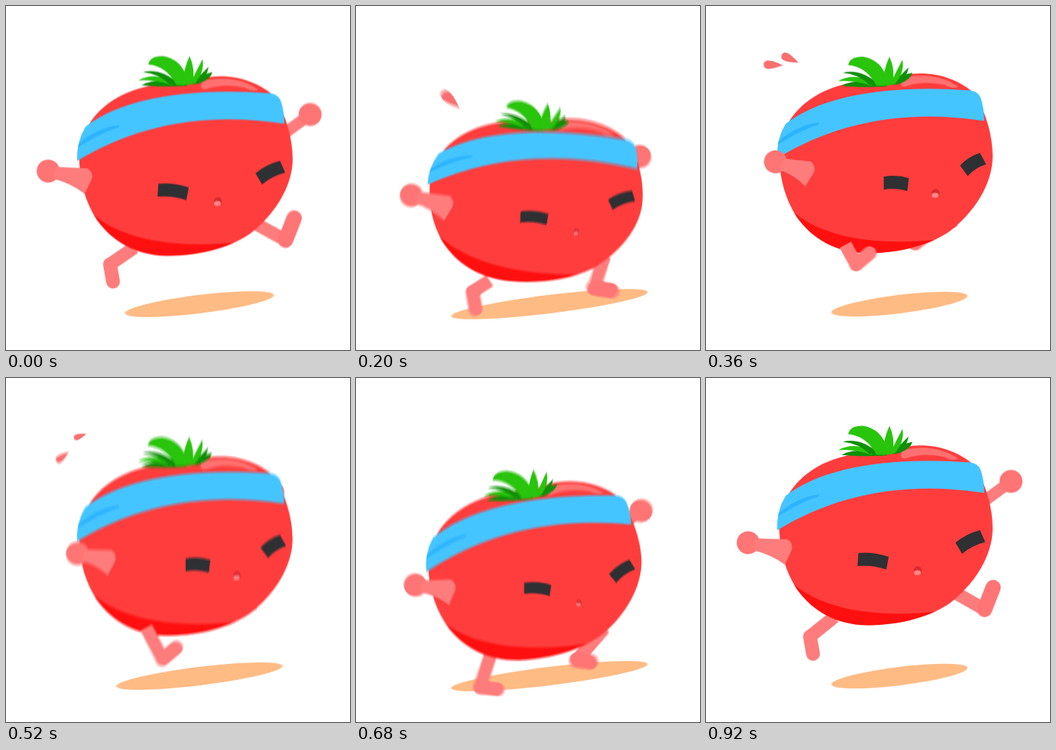
An HTML page with a canvas for the animation above (0.96 s loop, 450 px wide and 450 px high).

```html
<!DOCTYPE html>
<html lang="en">
<head>
<meta charset="utf-8">
<title>Running tomato</title>
<style>
html, body { margin: 0; width: 100%; height: 100%; overflow: hidden; background: #fff; }
canvas { display: block; width: 100vw; height: 100vh; }
</style>
</head>
<body>
<canvas id="stage" width="450" height="450"></canvas>
<script>
const SIZE = 450, LOOP = 960, STEP = 40;
const SHUTTER = 12, SAMPLES = 5;
const RED = '#ff3d3d', DEEP = '#ff1010', SKIN = '#ff7c7c', HAND = '#ff7575';
const BLUE = '#45c5ff', BLUE_DARK = '#2cb3ff', EYE = '#2e3033';
const GREEN = '#29c40c', GREEN_DARK = '#109008', SHADOW = '#ffbb84';

const screen = document.getElementById('stage').getContext('2d');
const layer = document.createElement('canvas');
layer.width = layer.height = SIZE;
const c = layer.getContext('2d');

const rad = deg => deg * Math.PI / 180;
// Cosine wave that peaks at the given time, some number of times per loop.
const wave = (t, peak, cycles = 1) => Math.cos(2 * Math.PI * cycles * (t - peak) / LOOP);
const ease = (t, from, to) => {
  const u = Math.min(1, Math.max(0, (t - from) / (to - from)));
  return u * u * (3 - 2 * u);
};

// Everything the run cycle shares: two bounces and one turn of the body per loop.
function poseAt(t) {
  const bounce = wave(t, 160, 2);
  const sink = (1 + bounce) / 2;
  const press = sink ** 3;
  const lean = wave(t, 200);
  return {
    t, bounce, press,
    dy: -7 + 54 * sink ** 1.9,
    tilt: press * (1.4 + 5.1 * lean),
    squash: 1 - press * (.055 + .03 * lean),
    leafDrop: 6 + 4.5 * wave(t, 240, 2),
    turn: wave(t, 460),
    swing: wave(t, 240),
    stride: wave(t, 460, 2)
  };
}

function shape(color, path) {
  c.fillStyle = color;
  c.fill(typeof path === 'string' ? new Path2D(path) : path);
}

function disc(color, x, y, rx, ry = rx, angle = 0) {
  c.fillStyle = color;
  c.beginPath();
  c.ellipse(x, y, rx, ry, rad(angle), 0, 2 * Math.PI);
  c.fill();
}

function line(color, width, cap, x0, y0, x1, y1) {
  c.strokeStyle = color;
  c.lineWidth = width;
  c.lineCap = cap;
  c.beginPath();
  c.moveTo(x0, y0);
  c.lineTo(x1, y1);
  c.stroke();
}

function placed(x, y, angle, draw) {
  c.save();
  c.translate(x, y);
  c.rotate(rad(angle));
  draw();
  c.restore();
}

function drawShadow({ bounce }) {
  disc(SHADOW, 253, 390, 109.5 + 23 * bounce, 12, -7);
}

function drawLeg(hipX, hipY, x, y, footAngle, footLength, footWidth, footColor) {
  const toeX = x + footLength * Math.cos(rad(footAngle));
  const toeY = y + footLength * Math.sin(rad(footAngle));
  line(SKIN, 17, 'butt', hipX, hipY, x, y);
  line(footColor, footWidth, 'round', x, y, toeX, toeY);
}

function drawNearLeg({ t, dy, turn, stride }) {
  const angle = 80 - 120 * (ease(t, 220, 350) - ease(t, 520, 900));
  drawLeg(176 + 8 * turn, 319 + dy,
    165 + 37 * turn + 8 * stride, 349 + dy + 16 * wave(t, 640), angle, 23, 18, SKIN);
}

function drawFarLeg({ t, dy, stride }) {
  const reach = wave(t, -5);
  drawLeg(325, 287 + dy,
    308 + 50 * reach + 8 * stride, 319 + dy - 10 * stride,
    -30 - 40 * stride, 20 + 11 * reach, 20, HAND);
}

function drawFarArm({ t, dy, swing }) {
  const x = 372 + 27 * wave(t, -45), y = 145 + dy + 12 * swing;
  line(SKIN, 15, 'butt', x, y, x - 34, y + 25);
  disc(HAND, x, y, 15);
}

function drawNearArm({ dy, turn, swing }) {
  const x = 75 + 20 * turn, y = 219 + dy - 12 * swing;
  const dx = 47 - 4 * turn, rise = 14 + 4 * swing;
  const reach = Math.hypot(dx, rise);
  placed(x, y, Math.atan2(rise, dx) * 180 / Math.PI, () => {
    disc(HAND, 0, 0, 15);
    shape(SKIN, `M8 -8 Q${reach * .6} -13 ${reach - 4} -17 Q${reach + 5} -14 ${reach + 5} -5
      L${reach + 1} 16 Q${reach * .6} 7 8 8 Z`);
  });
}

function drawLeaves() {
  shape(GREEN_DARK, 'M177 107 Q196 97 240 103 L236 108 Q200 110 177 107Z');
  shape(GREEN, 'M173 101 Q193 89 222 103 L216 107 Q192 99 173 101Z');
  shape(GREEN_DARK, 'M179 90 Q202 84 226 105 L214 106 Q200 92 179 90Z');
  shape(GREEN, 'M186 80 Q188 69 205 69 Q230 73 237 99 L234 107 H223 Q210 82 186 80Z');
  shape(GREEN_DARK, 'M244 106 Q256 92 270 90 Q268 99 252 105Z');
  shape(GREEN_DARK, 'M243 105 Q254 94 265 83 Q263 97 250 105Z');
  shape(GREEN, 'M241 105 Q249 88 257 73 Q260 90 247 105Z');
  shape(GREEN, 'M231 107 Q232 86 240 69 Q248 86 244 106Z');
}

function drawBody({ dy, tilt, squash, leafDrop, press }) {
  c.save();
  c.translate(235 - press, 215 + dy);
  c.rotate(rad(tilt));
  c.scale(1, squash);
  c.translate(-235, -215);

  const skin = new Path2D(`M96 208 C94 150 142 111 205 105 C225 104 238 104 248 100
    C285 88 327 98 352 122 C366 146 375 176 375 203 C375 240 350 278 318 302
    C286 323 245 330 210 330 C170 329 140 312 119 283 C104 260 97 234 96 208Z`);
  shape(RED, skin);
  c.save();
  c.clip(skin);
  shape(DEEP, 'M104 266 C140 307 215 322 305 312 L260 340 H150Z');
  c.restore();
  shape('#ff7070', `M255 109 Q253 101 268 99 Q303 94 330 112
    Q324 116 312 110 Q287 104 264 111 Q257 114 255 109Z`);

  c.save();
  c.translate(0, leafDrop - 2);
  drawLeaves();
  c.restore();

  shape(BLUE, `M104 161 C150 125 235 109 345 117 Q355 118 359 126 Q364 140 364 157
    C260 141 170 159 93 206 Q92 181 104 161Z`);
  shape(BLUE_DARK, 'M95 184 Q118 163 148 159 Q149 162 140 164 Q117 173 94 188Z');
  c.restore();
}

function drawEye(x, y, w, h, angle) {
  const r = w / 2, b = h / 2;
  placed(x, y, angle, () => shape(EYE,
    `M${-r} ${1 - b} Q0 ${-b - 3} ${r} ${1 - b} L${r - 1} ${b} Q0 ${b - 4} ${1 - r} ${b}Z`));
}

function drawFace({ dy, turn, tilt, press }) {
  const height = 18 - 3 * press, size = 1 - .4 * press;
  const mouthX = 290 + 13 * turn, mouthY = 255 + dy - 4 * turn;
  drawEye(235 + 17 * turn, 242 + dy - 4 * turn - 7 * press, 36 - 4 * turn, height, 5 - 2 * turn);
  drawEye(348 + 2 * turn, 217 + dy - 4 * turn - 5 * press, 33 - 3 * turn, height,
    -30 - 3 * turn + 1.7 * tilt);
  disc('#d52c30', mouthX, mouthY, 5.2 * size, 6 * size);
  disc('#ff8585', mouthX - .5, mouthY + 2.5 * size, 4.5 * size, 3.3 * size);
}

// A drop of sweat on a curved flight; u counts units of 160 ms.
function drawDrop(u, x, y, angle, size) {
  placed(x, y, angle, () => {
    c.scale(size, size);
    shape('#f96f70', 'M1 0 C.4 -.25 -1 -.85 -1 0 C-1 .85 .4 .25 1 0Z');
  });
}

function drawSweat({ t }) {
  const u = (t - 200) / 160, v = u - 1;
  if (u > -.4 && u < 2.4) {
    drawDrop(u, 124 - 47 * u + 11 * u * u, 123 - 82 * u + 36 * u * u, 42 - 40 * u, 15 - 2.5 * u);
  }
  if (v > -.6 && v < 1.4) {
    drawDrop(v, 110 - 13 * v, 69 - 10 * v + 17 * v * v, 25 - 45 * v, 12 - 3.5 * v);
  }
}

function drawScene(time) {
  const pose = poseAt((time + LOOP) % LOOP);
  const nearLegInFront = pose.turn > .5;

  c.fillStyle = '#fff';
  c.fillRect(0, 0, SIZE, SIZE);
  drawShadow(pose);
  drawFarArm(pose);
  drawFarLeg(pose);
  if (!nearLegInFront) drawNearLeg(pose);
  drawBody(pose);
  if (nearLegInFront) drawNearLeg(pose);
  drawFace(pose);
  drawNearArm(pose);
  drawSweat(pose);
}

// Averages a few moments for a short motion blur.
function render(time) {
  for (let i = 0; i < SAMPLES; i++) {
    drawScene(time + SHUTTER * (i / (SAMPLES - 1) - .5));
    screen.globalAlpha = 1 / (i + 1);
    screen.drawImage(layer, 0, 0);
  }
}

const start = performance.now();
let shown = -1;
function tick() {
  const elapsed = (performance.now() - start) % LOOP;
  const time = Math.floor(elapsed / STEP) * STEP;
  if (time !== shown) render(shown = time);
  requestAnimationFrame(tick);
}
tick();
</script>
</body>
</html>
```
